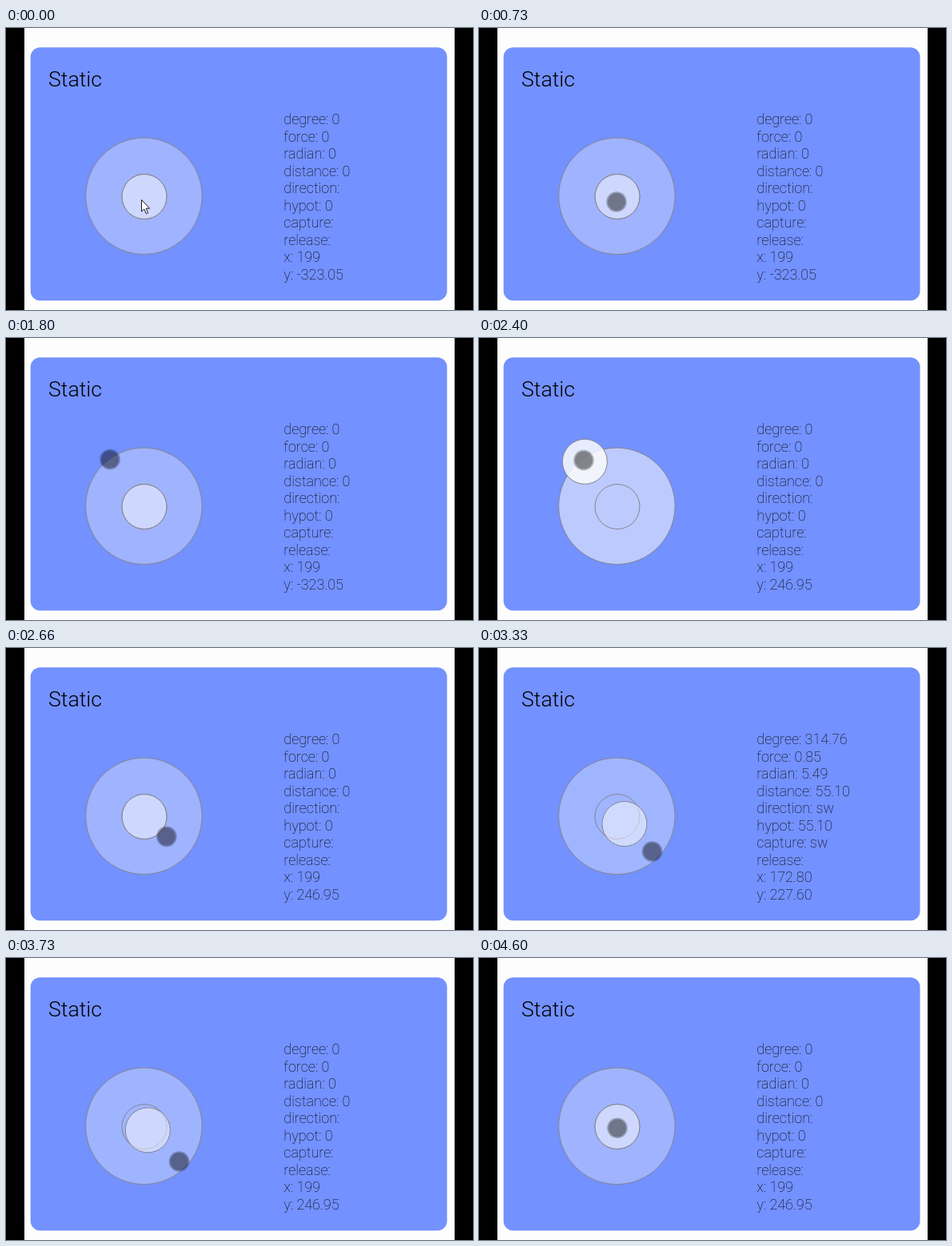
These frames come from a looping animation (584x352 px, 5.06 s). An HTML page:

```html
<!DOCTYPE html>
<html>
<head>
<meta charset="utf-8">
<style>
  html, body { margin: 0; width: 100%; height: 100%; overflow: hidden; background: #000; }
  svg { display: block; }
  text { font-family: Roboto, sans-serif; white-space: pre; }
  .line { fill: none; stroke: #85858f; stroke-width: 1; }
</style>
</head>
<body>
<svg width="584" height="352" viewBox="0 0 584 352">
  <rect x="23" width="538" height="352" fill="#fdfdfd"/>
  <rect x="30.7" y="24.3" width="520.8" height="316" rx="12" fill="#7391ff"/>
  <text x="53" y="73" font-size="26.7" font-weight="300">Static</text>
  <g id="readout" font-size="18" font-weight="100"></g>
  <circle id="base" class="line" cx="172.4" cy="209.8" r="72.7"/>
  <circle class="line" cx="173" cy="210.5" r="28"/>
  <circle id="knob" class="line" r="28"/>
  <g id="touch">
    <circle r="12.8" fill="#000" fill-opacity=".27"/>
    <circle r="11" fill="#000" fill-opacity=".25"/>
  </g>
  <path id="arrow" d="M169.5 214.5v14.5l3.3-3 2.5 5.7 2.3-1-2.4-5.5h4.4z" fill="#fff" stroke="#000" stroke-width=".9"/>
</svg>
<script>
// Times below are in steps: the picture advances 15 times a second
const STEP = 200 / 3, LOOP = 5060, RETURN_STEPS = 3;
const MAX_DISTANCE = 65, SCALE = 1.11;
const $ = id => document.getElementById(id);
const labels = ['degree', 'force', 'radian', 'distance', 'direction', 'hypot', 'capture', 'release', 'x', 'y'];

const drags = [
  { press: 29.67, release: 35.95, degree: 125.91, distance: 64.62, direction: 'ne', x: '199', y: '246.95' },
  { press: 49.67, release: 53.95, degree: 314.76, distance: 55.10, direction: 'sw', x: '172.80', y: '227.60' }
];
const moves = [
  { from: 11, to: 21, x: 130, y: 151.5 },
  { from: 29, to: 30, x: 131, y: 152.5 },
  { from: 36, to: 43, x: 216.5, y: 254 },
  { from: 56, to: 64, x: 172, y: 214 },
  { from: 68, to: 69, x: 173, y: 212.3 }
];

const radians = degree => degree * Math.PI / 180;

function easeOut(from, to, step) {
  const p = Math.min(1, Math.max(0, (step - from) / (to - from)));
  return 1 - (1 - p) ** 2;
}

function touchAt(step) {
  let x = 172, y = 217;
  for (const move of moves) {
    const p = easeOut(move.from, move.to, step);
    x += (move.x - x) * p;
    y += (move.y - y) * p;
  }
  return [x, y];
}

function pullOf({ press, release }, step) {
  return easeOut(press, press + RETURN_STEPS, step) - easeOut(release, release + RETURN_STEPS, step);
}

function readout(step) {
  const drag = drags.find(d => step >= d.press && step < d.release);
  if (!drag) return ['0', '0', '0', '0', '', '0', '', '', '199', step < drags[0].press ? '-323.05' : '246.95'];
  const { degree, distance, direction, x, y } = drag;
  const numbers = [degree, distance / MAX_DISTANCE, radians(degree), distance].map(n => n.toFixed(2));
  return [...numbers, direction, numbers[3], direction, '', x, y];
}

const rows = labels.map((label, i) => {
  const row = document.createElementNS('http://www.w3.org/2000/svg', 'text');
  row.setAttribute('x', 347.3);
  row.setAttribute('y', 120 + i * 21.56);
  return $('readout').appendChild(row);
});

function draw(time) {
  const step = Math.floor((time % LOOP + 7) / STEP);

  let x = 173, y = 210.5, glow = 0;
  for (const drag of drags) {
    const pull = pullOf(drag, step), reach = pull * drag.distance * SCALE;
    x += reach * Math.cos(radians(drag.degree));
    y -= reach * Math.sin(radians(drag.degree));
    glow += pull ** 2;
  }
  $('knob').setAttribute('cx', x);
  $('knob').setAttribute('cy', y);
  $('knob').style.fill = `rgba(253,253,253,${.5 + .36 * glow})`;
  $('base').style.fill = `rgba(253,253,253,${.31 + .24 * glow})`;

  const touching = step >= moves[0].from;
  $('arrow').style.display = touching ? 'none' : '';
  $('touch').style.display = touching ? '' : 'none';
  $('touch').setAttribute('transform', `translate(${touchAt(step)})`);

  const values = readout(step);
  rows.forEach((row, i) => row.textContent = `${labels[i]}: ${values[i]}`);
}

const start = performance.now();
function tick() {
  draw(performance.now() - start);
  requestAnimationFrame(tick);
}
tick();
</script>
</body>
</html>
```
